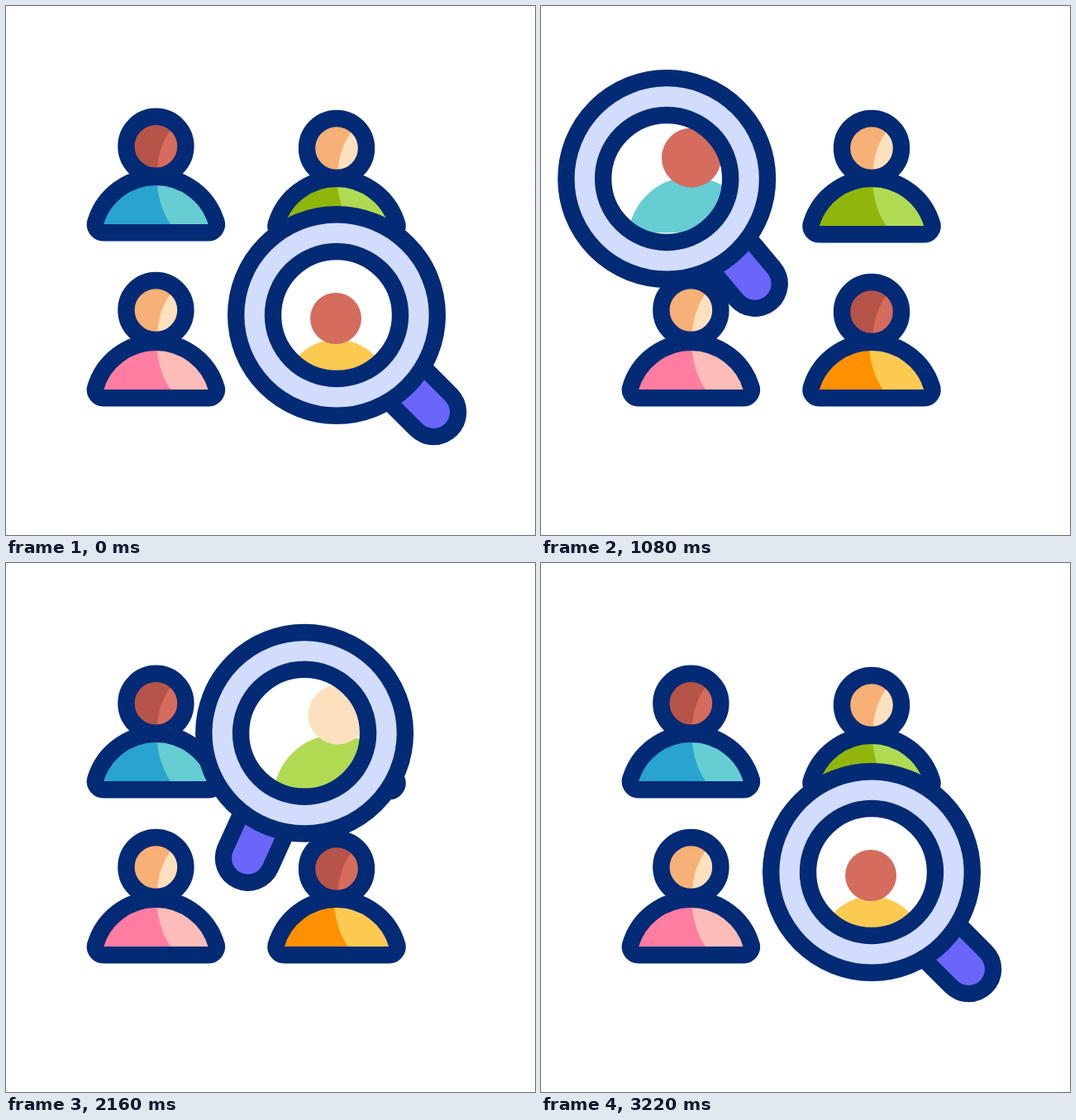
An HTML page for the animation above (3.42 s loop, 640 by 640 pixels).

```html
<!DOCTYPE html>
<html lang="en">
<head>
<meta charset="utf-8">
<title>People search</title>
<style>
  html, body { margin: 0; width: 100%; height: 100%; overflow: hidden; background: #fff; }
  svg { display: block; width: 100%; height: 100%; }
  .line { fill: none; stroke: #032a75; stroke-width: 20.4; stroke-linejoin: round; }
</style>
</head>
<body>
<svg viewBox="0 0 640 640">
  <defs><clipPath id="glass"><circle id="hole" r="70"/></clipPath></defs>
  <g id="people"></g>
  <g id="handle" stroke-linecap="round">
    <path d="M100 0H166" stroke="#032a75" stroke-width="79.8"/>
    <path d="M110 0H166" stroke="#6a66fa" stroke-width="39.2"/>
  </g>
  <g id="back">
    <circle r="121.8" fill="#d2dcfd"/>
    <circle r="77" fill="#fff"/>
  </g>
  <g id="magnified" clip-path="url(#glass)"></g>
  <g id="rings" class="line">
    <circle r="121.8"/>
    <circle r="77"/>
  </g>
</svg>
<script>
const $ = id => document.getElementById(id);
const brown = ['#b75449', '#d56c5d'], peach = ['#f7b075', '#fde0bd'];
const dome = 'M-63 10.2A10 10 0 0 1-73.4-1.4A76.2 76.2 0 0 1 73.4-1.4A10 10 0 0 1 63 10.2Z';

// zoom: head x, head y, head radius, body scale, body base as seen through the glass
const people = [
  { x: 181.4, head: 169.8, base: 264, skin: brown, shirt: ['#29a3cf', '#66cdd2'], zoom: [182, 183.6, 36, 1, 264] },
  { x: 181.4, head: 368, base: 464, skin: peach, shirt: ['#ff7da1', '#fdbcb7'], zoom: [182, 382, 36, 1, 464] },
  { x: 400, head: 172, base: 266, skin: peach, shirt: ['#91b60b', '#b1da53'], zoom: [401.5, 183.6, 36, 1, 265] },
  { x: 400, head: 370, base: 464, skin: brown, shirt: ['#ff9100', '#fdca51'], shade: -4, zoom: [399, 378, 31, .82, 450] }
];

for (const { x, head, base, skin, shirt, shade = 0, zoom } of people) {
  $('people').innerHTML += `
    <g transform="translate(${x} ${base})">
      <path d="${dome}" fill="${shirt[1]}"/>
      <path d="M${1 + shade}-52Q${3 + shade}-20 ${19 + shade} 2H-68A70 70 0 0 1 ${1 + shade}-52Z" fill="${shirt[0]}"/>
      <path d="${dome}" class="line"/>
    </g>
    <g transform="translate(${x} ${head})">
      <circle r="36" fill="${skin[1]}"/>
      <path d="M18.5-21Q3 0 1.5 28A28 28 0 1 1 18.5-21Z" fill="${skin[0]}"/>
      <circle r="36" class="line"/>
    </g>`;
  const [hx, hy, r, scale, bottom] = zoom;
  $('magnified').innerHTML += `
    <path d="${dome}" transform="translate(${x} ${bottom}) scale(${scale})" fill="${shirt[1]}"/>
    <circle cx="${hx}" cy="${hy}" r="${r}" fill="${skin[1]}"/>`;
}

// Each move: start and length in ms, handle angles, cubic curve of the lens centre
const moves = [
  { start: 0, length: 704, turn: [45, 45], curve: [[400, 374], [325, 303], [279, 193], [179.5, 174]] },
  { start: 900, length: 604, turn: [45, 68], curve: [[179.5, 174], [125, 217], [129, 318], [171, 383.8]] },
  { start: 1700, length: 604, turn: [68, 122], curve: [[171, 383.8], [235, 345], [303, 207], [401, 193]] },
  { start: 2500, length: 704, turn: [122, 45], curve: [[401, 193], [420, 191], [402, 246], [400, 374]] }
];

const bezier = ([a, b, c, d], s, k) => {
  const q = 1 - s;
  return q * q * q * a[k] + 3 * q * q * s * b[k] + 3 * q * s * s * c[k] + s * s * s * d[k];
};

function draw() {
  const time = performance.now() % 3420;
  const { start, length, turn, curve } = moves.findLast(m => m.start <= time);
  const t = Math.min(1, (time - start) / length);
  const s = t * t * (3 - 2 * t);
  const x = bezier(curve, s, 0), y = bezier(curve, s, 1);
  const place = `translate(${x} ${y})`;
  for (const id of ['back', 'rings', 'hole']) $(id).setAttribute('transform', place);
  $('handle').setAttribute('transform', `${place} rotate(${turn[0] + (turn[1] - turn[0]) * s})`);
  requestAnimationFrame(draw);
}
draw();
</script>
</body>
</html>
```
